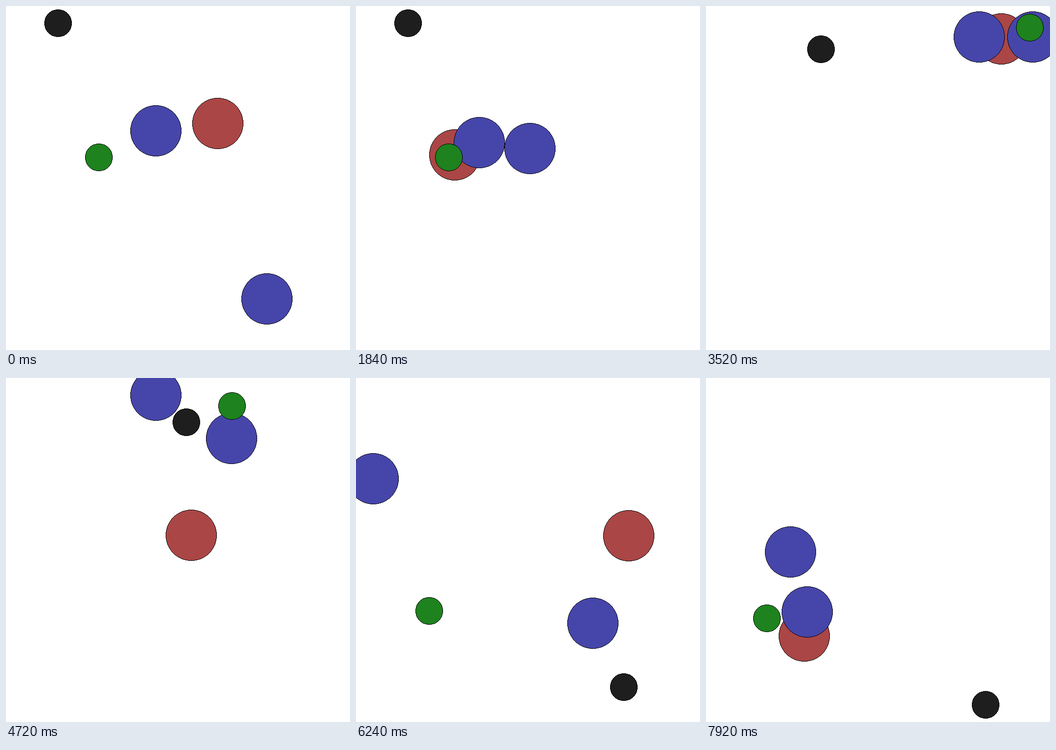
Animation of 700x700 px, one loop 8 s. Source, as an HTML page with a canvas:

```html
<!DOCTYPE html>
<html lang="en">
<head>
<meta charset="utf-8">
<title>Agents and landmarks</title>
<style>
  html, body { margin: 0; width: 100%; height: 100%; overflow: hidden; background: #fff; }
  canvas { display: block; width: 700px; height: 700px; }
</style>
</head>
<body>
<canvas id="stage" width="700" height="700"></canvas>
<script>
const ctx = document.getElementById('stage').getContext('2d');
const STEP = 80, STEPS = 100, EPISODE = 26, HALF = 350;
const RED = 'rgb(170,70,70)', BLUE = 'rgb(70,70,170)';
const GREEN = 'rgb(30,130,30)', BLACK = 'rgb(30,30,30)';

// Each agent starts at rest, sweeps through a turning point and comes to an end point.
const episodes = [
  {
    green: [-159.6, -41], black: [-243.1, -315], turn: 14, end: 23,
    red: [[82, -110], [-277.5, -110.4], [-148, -46]],
    blue1: [[-44, -95], [-324.9, -3.1], [-98, -71]],
    blue2: [[182, 247], [-251.7, 8.3], [5, -59]]
  },
  {
    green: [315, -311.2], black: [-116.6, -265.6], turn: 18, end: 25,
    red: [[60, 305], [256.3, -286.9], [310, -320]],
    blue1: [[-296, 120], [210, -290.9], [300, -330]],
    blue2: [[150, 60], [320.4, -290.9], [290, -340]]
  },
  {
    green: [119.9, -315], black: [18.9, -279], turn: 7, end: 25,
    red: [[100, 249], [30.2, -31.3], [60, -230]],
    blue1: [[-279, -60], [-47.5, -339.7], [100, -290]],
    blue2: [[290, -20], [118.6, -243.7], [170, -270]]
  },
  {
    green: [-225.45, 140.1], black: [220.3, 315], turn: 14, end: 21,
    red: [[232, -31.5], [-308, 140], [-149, 176]],
    blue1: [[-354.85, -162.3], [-140, 80], [-177, 5]],
    blue2: [[149.8, 169], [-285, 110], [-143, 127]]
  }
];

// Cubic from a to b over h steps, with the given speeds at its ends.
function glide(a, b, speedA, speedB, h, t) {
  const u = t / h, v = 1 - u;
  return v * v * (1 + 2 * u) * a + u * u * (3 - 2 * u) * b + h * u * v * (v * speedA - u * speedB);
}

function travel([a, b, c], turn, end, step) {
  const t = Math.max(step - 1, 0);              // the first step only sets the agents off
  const h1 = turn - 1, h2 = end - turn;
  const rate1 = (b - a) / h1, rate2 = (c - b) / h2;
  const mid = (rate1 * h2 + rate2 * h1) / (h1 + h2), last = rate2 / 4;
  if (t < h1) return glide(a, b, 0, mid, h1, t);
  if (t < h1 + h2) return glide(b, c, mid, last, h2, t - h1);
  return c + last * (t - h1 - h2);
}

// Hard-edged disc, row by row, with a one-pixel black rim.
function disc(x, y, r, fill) {
  const width = i => Math.round(Math.sqrt(Math.max(r * r - (i + 0.5) ** 2, 0)));
  const row = (i, w, color) => {
    ctx.fillStyle = color;
    ctx.fillRect(x - w, y + i, 2 * w, 1);
    ctx.fillRect(x - w, y - 1 - i, 2 * w, 1);
  };
  for (let i = 0; i < r; i++) {
    row(i, width(i), '#000');
    row(i, Math.min(width(i) - 1, width(i + 1)), fill);
  }
}

function draw(step) {
  const ep = episodes[Math.floor(step / EPISODE)];
  const agent = (path, fill) => ({
    pos: [0, 1].map(axis => travel(path.map(p => p[axis]), ep.turn, ep.end, step % EPISODE)),
    r: 52, fill
  });
  const items = [
    agent(ep.red, RED), agent(ep.blue1, BLUE), agent(ep.blue2, BLUE),
    { pos: ep.green, r: 28, fill: GREEN }, { pos: ep.black, r: 28, fill: BLACK }
  ];

  // The view zooms so that the farthest centre stays at 90% of the half width.
  const range = Math.max(...items.flatMap(o => o.pos.map(Math.abs)));
  const place = v => Math.floor(HALF + Math.floor(v / range * HALF) * 0.9 + 1e-6);

  ctx.fillStyle = '#fff';
  ctx.fillRect(0, 0, 700, 700);
  for (const { pos, r, fill } of items) disc(place(pos[0]), place(pos[1]), r, fill);
}

const start = performance.now();
function tick() {
  draw(Math.floor((performance.now() - start) / STEP) % STEPS);
  requestAnimationFrame(tick);
}
tick();
</script>
</body>
</html>
```
